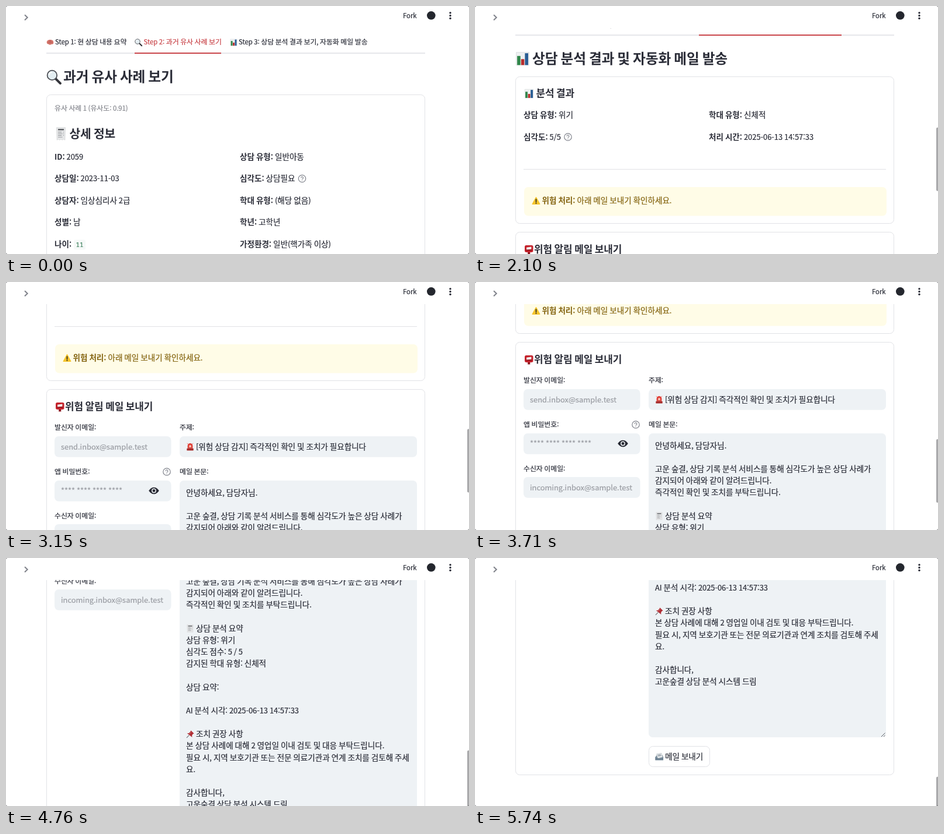
Recreate the animation shown at these times as an HTML page. Size 792 by 426 pixels, loop 5.81 s.

```html
<!DOCTYPE html>
<html lang="ko">
<head>
<meta charset="utf-8">
<title>상담 분석</title>
<style>
  html, body { margin: 0; width: 100%; height: 100%; overflow: hidden; background: #fff; }
  svg { display: block; width: 792px; height: 426px; }
  text { font-family: "Noto Sans CJK KR", "Noto Sans CJK JP", "Noto Sans CJK", sans-serif; white-space: pre;
    color: #2b2d38; fill: currentColor; stroke: currentColor; stroke-width: .22px; }
  tspan { word-spacing: -.052em; }
  .b { font-weight: 700; stroke: none; }
  .h { font-weight: 700; stroke: none; letter-spacing: -.005em; }
  .mono { font-family: "Noto Sans Mono", "DejaVu Sans Mono", monospace; }
  .card { fill: #fff; stroke: #e1e2e6; stroke-width: 1; }
  .field { fill: #eef2f5; }
</style>
</head>
<body>
<svg id="stage" viewBox="0 0 792 426"></svg>
<script>
const INK = '#2b2d38', RED = '#c9454a', HINT = '#9a9da3';
const LOOP = 5810, TICK = 70;

// Hangul and Latin glyphs run at slightly different scales.
const HANGUL = .9413, LATIN = .895;
const runs = (s, size) => s.replace(/[\x20-\x7e]+/g, m =>
  `<tspan font-size="${(size * LATIN).toFixed(2)}">${m}</tspan>`);
const text = (x, y, s, size = 14.4, attrs = '') =>
  `<text x="${x}" y="${y}" font-size="${(size * HANGUL).toFixed(2)}" ${attrs}>${runs(s, size)}</text>`;
const heading = (x, y, s, size) => text(x, y, s, size, 'class="h"');
const tinted = color => `style="color:${color}"`;
const pair = (x, y, key, value, color = INK) =>
  `<text x="${x}" y="${y}" font-size="${(14.4 * HANGUL).toFixed(2)}" ${tinted(color)}>` +
  `<tspan class="b">${runs(key + ':', 14.4)}</tspan>${runs(' ' + value, 14.4)}</text>`;
const box = (cls, x, y, w, h, r = 7) =>
  `<rect class="${cls}" x="${x}" y="${y}" width="${w}" height="${h}" rx="${r}"/>`;

// Icons on a 16 x 16 grid.
const icons = {
  brain: `<path d="M1 9C0 5 4 2 8 2.500c5-1 8 3 7 7 0 2-3 3-5 2.500-1 2-4 1.500-4.500 0C3 12 1 11 1 9z" fill="#d8796f"/>
    <path d="M4 5c2 0 2 2 4 2s2-2 4-1M3 9c3-1 4 1 6 0s3 0 4 0M8 3v3" fill="none" stroke="#a84a48"/>`,
  lens: `<path d="M9.800 9.800L15 15" stroke="#34353b" stroke-width="2.600" stroke-linecap="round"/>
    <circle cx="6.200" cy="6.200" r="5.200" fill="#e3edf1" stroke="#4b4d53" stroke-width="1.100"/>
    <path d="M3 6a3.300 3.300 0 0 1 3-3" fill="none" stroke="#fff" stroke-width="1.300"/>`,
  chart: `<path d="M1 1h14v14H1z" fill="#eef0f1" stroke="#d5d9dc" stroke-width=".5"/>
    <path d="M2 5h3.600v10H2z" fill="#30864a"/><path d="M6.300 8.500h3.500V15H6.300z" fill="#b72c2c"/>
    <path d="M10.500 2h3.600v13h-3.600z" fill="#295d94"/>`,
  receipt: `<path d="M2 .5h12l-.5 15-2-1-1.800 1-1.700-1-1.700 1-1.800-1-2 1z" fill="#e6e7e8" stroke="#cfd1d3" stroke-width=".5"/>
    <path d="M4 3h8" stroke="#55585d" stroke-width="1.600"/>
    <path d="M4 6h5M4 8h6M4 10h5M4 12h6M11 6h1M11 8h1M11 10h1" stroke="#9a9da1" stroke-width=".8"/>`,
  warning: `<path d="M8 2l6.500 12h-13z" fill="#f6c52d" stroke="#f6c52d" stroke-width="1.800" stroke-linejoin="round"/>
    <path d="M8 5.500v4.500" stroke="#2b2823" stroke-width="1.800" stroke-linecap="round"/><circle cx="8" cy="12.500" r="1.100" fill="#2b2823"/>`,
  postbox: `<path d="M6 11h4v5H6z" fill="#8f1820"/><rect x="1" y="1" width="14" height="11.500" rx="2.500" fill="#c4222b"/>
    <path d="M4 4.500l8-1v4l-8 1z" fill="#f4efee"/><path d="M3 9h10" stroke="#7d141b" stroke-width="1.200"/>`,
  siren: `<path d="M3 11V6a5 5 0 0 1 10 0v5z" fill="#df4038"/><path d="M2 1l2 2M14 1l-2 2" stroke="#e0665e"/>
    <path d="M6 9V6.500a2 2 0 0 1 4 0V9z" fill="#f7c5b8"/><rect x="1.500" y="11" width="13" height="4.500" rx="1" fill="#a62c2b"/>`,
  pin: `<path d="M6 10L1 15" stroke="#6f7378" stroke-width="1.300"/>
    <path d="M9.500.5l6 6-2.500 1.300-1.500 3.200.5 3L2 6l3.500 0L8.500 3z" fill="#b02f36"/><path d="M10 4L6 8" stroke="#dd7f7c"/>`,
  mail: `<path d="M2 6l12-1 1.500 4v5.500H.5V9z" fill="#8699a6"/><path d="M3 3l9-1.500 2 7.500-9 2z" fill="#eef1f3" stroke="#9aa5ad" stroke-width=".6"/>
    <path d="M.5 8.500l7 3.500 8-3v5.500H.5z" fill="#6d8293"/><path d="M5 5l6-1M5.500 7l6-1" stroke="#596773" stroke-width=".9"/>`
};
const icon = (name, x, y, w, h = w) =>
  `<g transform="translate(${x} ${y}) scale(${w / 16} ${h / 16})">${icons[name]}</g>`;
const help = (x, y) => `<g transform="translate(${x} ${y})" fill="none" stroke="#7f828b" stroke-width="1.200">
  <circle r="6.200"/><path d="M-1.900-1.300a1.900 1.900 0 1 1 2.900 1.600Q0 .7 0 1.500M0 2.700v1.100"/></g>`;

const tabs = `<path d="M69 81H717" stroke="#e6e7eb" stroke-width="1.800"/>` +
  icon('brain', 69, 56, 13) + text(84, 66.3, 'Step 1: 현 상담 내용 요약', 12.6) +
  icon('lens', 220, 56, 13) + text(235.5, 66.3, 'Step 2: 과거 유사 사례 보기', 12.6, 'id="tab2"') +
  icon('chart', 383, 56, 13) + text(398, 66.3, 'Step 3: 상담 분석 결과 보기, 자동화 메일 발송', 12.6, 'id="tab3"') +
  `<rect id="underline" y="80" height="2" fill="${RED}"/>`;

const caseRows = [
  ['ID', '2059', '상담 유형', '일반아동'],
  ['상담일', '2023-11-03', '심각도', '상담필요'],
  ['상담자', '임상심리사 2급', '학대 유형', '(해당 없음)'],
  ['성별', '남', '학년', '고학년'],
  ['나이', '', '가정환경', '일반(핵가족 이상)']
];
const casePage = icon('lens', 69, 109, 25.5) + heading(98, 130, '과거 유사 사례 보기', 25.2) +
  box('card', 69.5, 152.5, 647, 600) +
  text(83, 180.3, '유사 사례 1 (유사도: 0.91)', 12.6, tinted('#83858c')) +
  icon('receipt', 84, 208, 20, 23) + heading(108.5, 226.5, '상세 정보', 21.6) +
  caseRows.map(([a, b, c, d], i) => {
    const y = 264 + i * 37.4;
    return pair(83, y, a, b) + pair(400, y, c, d);
  }).join('') + help(506.5, 296.5) +
  `<rect x="116" y="401.500" width="20" height="17" rx="3" fill="#f6f9f8"/>
   <text class="mono" x="119.500" y="414" font-size="10.800" ${tinted('#3b7f5c')}>11</text>`;

const letter = [
  '안녕하세요, 담당자님.', '',
  '고운 숲결, 상담 기록 분석 서비스를 통해 심각도가 높은 상담 사례가',
  '감지되어 아래와 같이 알려드립니다.',
  '즉각적인 확인 및 조치를 부탁드립니다.', '',
  ['receipt', '상담 분석 요약'],
  '상담 유형: 위기', '심각도 점수: 5 / 5', '감지된 학대 유형: 신체적', '',
  '상담 요약:', '',
  'AI 분석 시각: 2025-06-13 14:57:33', '',
  ['pin', '조치 권장 사항'],
  '본 상담 사례에 대해 2 영업일 이내 검토 및 대응 부탁드립니다.',
  '필요 시, 지역 보호기관 또는 전문 의료기관과 연계 조치를 검토해 주세',
  '요.', '',
  '감사합니다,', '고운숲결 상담 분석 시스템 드림'
];
const letterLine = (line, i) => {
  const y = 601.8 + i * 20.16;
  return Array.isArray(line)
    ? icon(line[0], 308, y - 11.5, 14) + text(325, y, line[1])
    : text(308, y, line);
};
const resultPage = icon('chart', 69, 109, 25) + heading(98, 130, '상담 분석 결과 및 자동화 메일 발송', 25.2) +
  box('card', 69.5, 152.5, 647, 252) +
  icon('chart', 84, 173, 17) + heading(104.5, 187.2, '분석 결과', 18) +
  pair(83, 223, '상담 유형', '위기') + pair(400, 223, '학대 유형', '신체적') +
  pair(83, 261, '심각도', '5/5') + help(159, 256) + pair(400, 261, '처리 시간', '2025-06-13 14:57:33') +
  `<path d="M83 311.500H703" stroke="#e1e2e6"/>` +
  `<rect x="84" y="342" width="620" height="49.500" rx="7" fill="#fffce7"/>` +
  icon('warning', 97, 358, 15) + pair(114.5, 370, '위험 처리', '아래 메일 보내기 확인하세요.', '#846410') +
  box('card', 69.5, 419.5, 647, 761) +
  icon('postbox', 84, 441, 16.5) + heading(101, 455.2, '위험 알림 메일 보내기', 18) +
  text(83, 489.4, '발신자 이메일:', 12.6) + text(297, 489.4, '주제:', 12.6) +
  box('field', 83, 500, 199.5, 35.7) + text(94, 523, 'send.inbox@sample.test', 14.4, tinted(HINT)) +
  box('field', 297, 500, 406, 35.7) + icon('siren', 308, 511, 14) +
  text(325, 522.6, '[위험 상담 감지] 즉각적인 확인 및 조치가 필요합니다') +
  text(83, 565.3, '앱 비밀번호:', 12.6) + help(275, 561) + text(297, 565.3, '메일 본문:', 12.6) +
  box('field', 83, 576, 199.5, 35.7) + text(94, 598, '**** **** **** ****', 14.4, tinted(HINT)) +
  `<g transform="translate(253 593.500)"><path d="M-8.800 0Q-5-5.800 0-5.800T8.800 0Q5 5.800 0 5.800T-8.800 0z" fill="#292b35"/>
   <circle r="3.900" fill="#eef2f5"/><circle r="2.400" fill="#292b35"/></g>` +
  text(83, 640.6, '수신자 이메일:', 12.6) +
  box('field', 83, 651, 199.5, 35.7) + text(94, 674, 'incoming.inbox@sample.test', 14.4, tinted(HINT)) +
  box('field', 297, 576, 406, 540) + letter.map(letterLine).join('') +
  `<path d="M695 1115l6.500-6.500M699 1115l2.500-2.500" stroke="#555860" stroke-width="1"/>` +
  box('card', 297.5, 1131.5, 104, 35) + icon('mail', 308, 1142, 14.5) + text(325, 1153.8, '메일 보내기');

const header = `<path d="M0 0H792V38H0z" fill="#fff"/>
  <path d="M32 15.300l4.700 4.500-4.700 4.500" fill="none" stroke="#80838b" stroke-width="2"/>` +
  text(679, 20.6, 'Fork', 12.6) +
  `<circle cx="727.300" cy="16.300" r="7.300" fill="#24272e"/>` +
  [11.8, 16.5, 21.2].map(y => `<circle cx="760" cy="${y}" r="1.700" fill="${INK}"/>`).join('');

const $ = id => document.getElementById(id);
$('stage').innerHTML = `<g id="page">${tabs}<g id="cases">${casePage}</g><g id="results">${resultPage}</g></g>
  ${header}<rect id="thumb" x="789" width="6" rx="2" fill="#a9a9ab"/>
  <path d="M0 0H792V426H0zM3 0Q0 0 0 3V423Q0 426 3 426H789Q792 426 792 423V3Q792 0 789 0z" fill="#77787b" fill-rule="evenodd"/>`;

// Each flick: start time, number of ticks, scroll offset reached.
const flicks = [[2030, 5, 88], [2590, 4, 165], [3080, 4, 305], [3710, 6, 453.5],
  [4270, 4, 590.6], [4760, 9, 776], [5390, 2, 796], [5740, 1, 808]];
const progress = (t, start, ticks) => {
  const p = Math.min(1, Math.max(0, ((t - start) / TICK + 1) / ticks));
  return p * p * (3 - 2 * p);
};
const mix = (a, b, p) => a + (b - a) * p;

function draw(t) {
  const scroll = Math.round(flicks.reduce((s, [start, ticks, end]) => mix(s, end, progress(t, start, ticks)), 0));
  const switched = t >= 910;
  const slide = progress(t, 910, 8);

  $('page').setAttribute('transform', `translate(0 ${-scroll})`);
  $('cases').style.display = switched ? 'none' : '';
  $('results').style.display = switched ? '' : 'none';
  $('tab2').style.color = switched ? INK : RED;
  $('tab3').style.color = t < 630 ? INK : t < 700 ? '#7a3a42' : RED;
  $('underline').setAttribute('x', mix(220, 383, slide));
  $('underline').setAttribute('width', mix(148, 244, slide));

  $('thumb').style.display = t < 630 ? 'none' : '';
  $('thumb').setAttribute('y', switched ? 202 + scroll / 4.65 : 194);
  $('thumb').setAttribute('height', switched ? 109 : 104);
}

function tick() {
  draw(Math.floor(performance.now() % LOOP / TICK) * TICK);
  requestAnimationFrame(tick);
}
tick();
</script>
</body>
</html>
```
